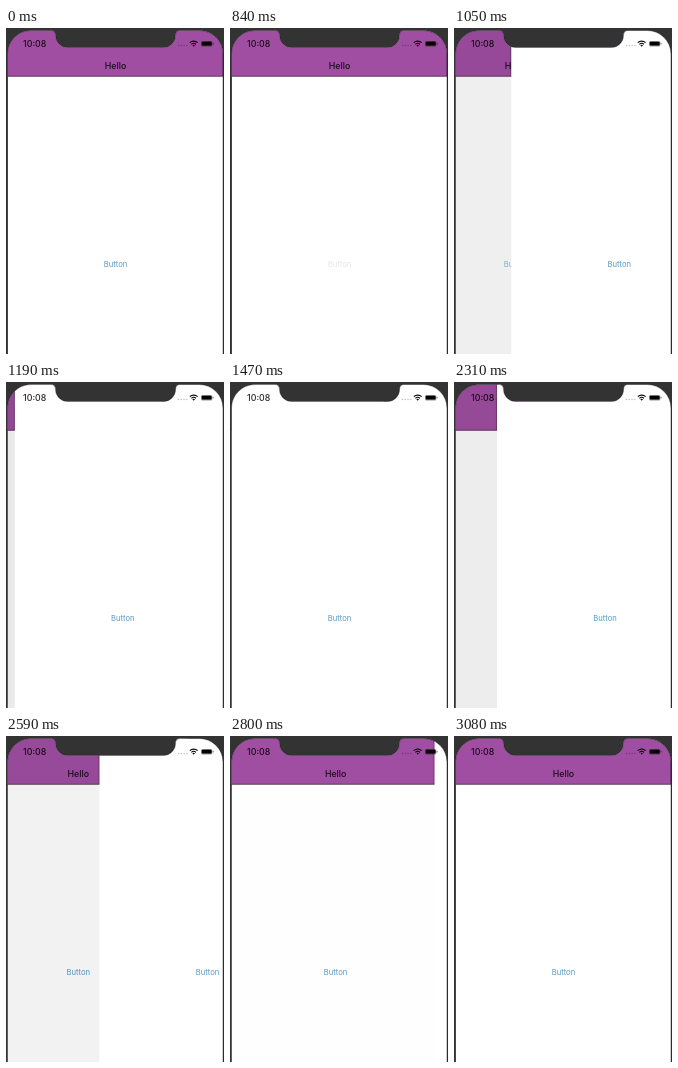
Animation of 218x326 px, one loop 3.22 s. Source, as an HTML page:

```html
<!DOCTYPE html>
<html lang="en">
<head>
<meta charset="utf-8">
<title>Push and swipe back</title>
<style>
  html, body { margin: 0; width: 100%; height: 100%; overflow: hidden; background: #333; }
  svg { display: block; }
  text { font-family: Inter, "Liberation Sans", sans-serif; text-anchor: middle; }
  .bold { font-size: 8.8px; font-weight: 500; }
  .button { font-size: 7.65px; fill: #569ac8; }
</style>
</head>
<body>
<svg width="218" height="326" viewBox="0 0 218 326">
  <defs>
    <path id="screen" d="M1.5 327V26A23.5 23.5 0 0 1 25 2.5H45Q49.5 2.5 49.5 7.5A12 12 0 0 0 61.5 19.5H157.5A12 12 0 0 0 169.5 7.5Q169.5 2.5 174 2.5H193.5A23.5 23.5 0 0 1 217 26V327Z"/>
    <clipPath id="clip"><use href="#screen"/></clipPath>
  </defs>
  <rect width="218" height="326" fill="#333"/>
  <g clip-path="url(#clip)">
    <g id="home">
      <rect x="1.5" width="217" height="326" fill="#fff"/>
      <rect x="1.5" width="217" height="48.4" fill="#a04ea2"/>
      <rect x="1.5" y="47.8" width="217" height="1" opacity=".5"/>
      <text class="bold" x="109.5" y="40.6" fill="#1c0c1f">Hello</text>
      <text class="button" id="press" x="109.5" y="238.8">Button</text>
    </g>
    <rect id="dim" width="218" height="326"/>
    <g id="detail">
      <rect x=".5" width="1" height="48" opacity=".3"/>
      <rect x="1.5" width="217" height="326" fill="#fff"/>
      <text class="button" x="109.5" y="238.8">Button</text>
    </g>
    <!-- status bar -->
    <text class="bold" x="28.7" y="19" opacity=".85">10:08</text>
    <g opacity=".25">
      <circle cx="172.5" cy="17.5" r=".8"/><circle cx="175.3" cy="17.5" r=".8"/>
      <circle cx="178.1" cy="17.5" r=".8"/><circle cx="180.9" cy="17.5" r=".8"/>
    </g>
    <path d="M183.8 14.7A5.5 5.5 0 0 1 191.6 14.7M185.4 16.4A3.3 3.3 0 0 1 190 16.4" fill="none" stroke="#000" stroke-width="1.1"/>
    <path d="M186.4 17.3Q187.7 16.4 189 17.3L187.7 18.7Z"/>
    <rect x="195" y="13" width="11.4" height="5.4" rx="1.5" opacity=".4"/>
    <rect x="195.8" y="13.8" width="9.8" height="3.8" rx=".8"/>
    <rect x="206.8" y="14.8" width=".9" height="1.8" rx=".4" opacity=".4"/>
  </g>
  <use href="#screen" fill="none" stroke="#151515" stroke-width=".7" opacity=".6"/>
</svg>
<script>
const LOOP = 3220, STEP = 70, WIDTH = 216;
const PRESS = 840, PUSH = 905, DRAG = 2100, RELEASE = 2590;
const part = id => document.getElementById(id);
const [home, press, dim, detail] = ['home', 'press', 'dim', 'detail'].map(part);

// Remaining share of a critically damped spring after ms
const spring = ms => (1 + 0.01826 * ms) * Math.exp(-0.01826 * ms);
const drag = ms => 0.2048 * ms - 0.0000348 * ms * ms;

function offset(t) {
  if (t < PUSH) return WIDTH;
  if (t < DRAG) return WIDTH * spring(t - PUSH);
  if (t < RELEASE) return drag(t - DRAG);
  const held = drag(RELEASE - DRAG);
  return WIDTH - (WIDTH - held) * spring(t - RELEASE);
}

function draw(now) {
  const t = Math.floor(now % LOOP / STEP) * STEP;
  const x = offset(t);
  const covered = 1 - x / WIDTH;
  home.setAttribute('transform', `translate(${-0.3 * WIDTH * covered})`);
  detail.setAttribute('transform', `translate(${x})`);
  dim.setAttribute('opacity', 0.086 * covered);
  const pressed = t >= PRESS && t < DRAG;
  press.setAttribute('opacity', pressed ? Math.min(1, 0.2 + Math.max(0, t - PUSH) / 300) : 1);
  press.style.fill = t === PRESS ? '#888' : '';
}

const start = performance.now();
function tick() {
  draw(performance.now() - start);
  requestAnimationFrame(tick);
}
tick();
</script>
</body>
</html>
```
